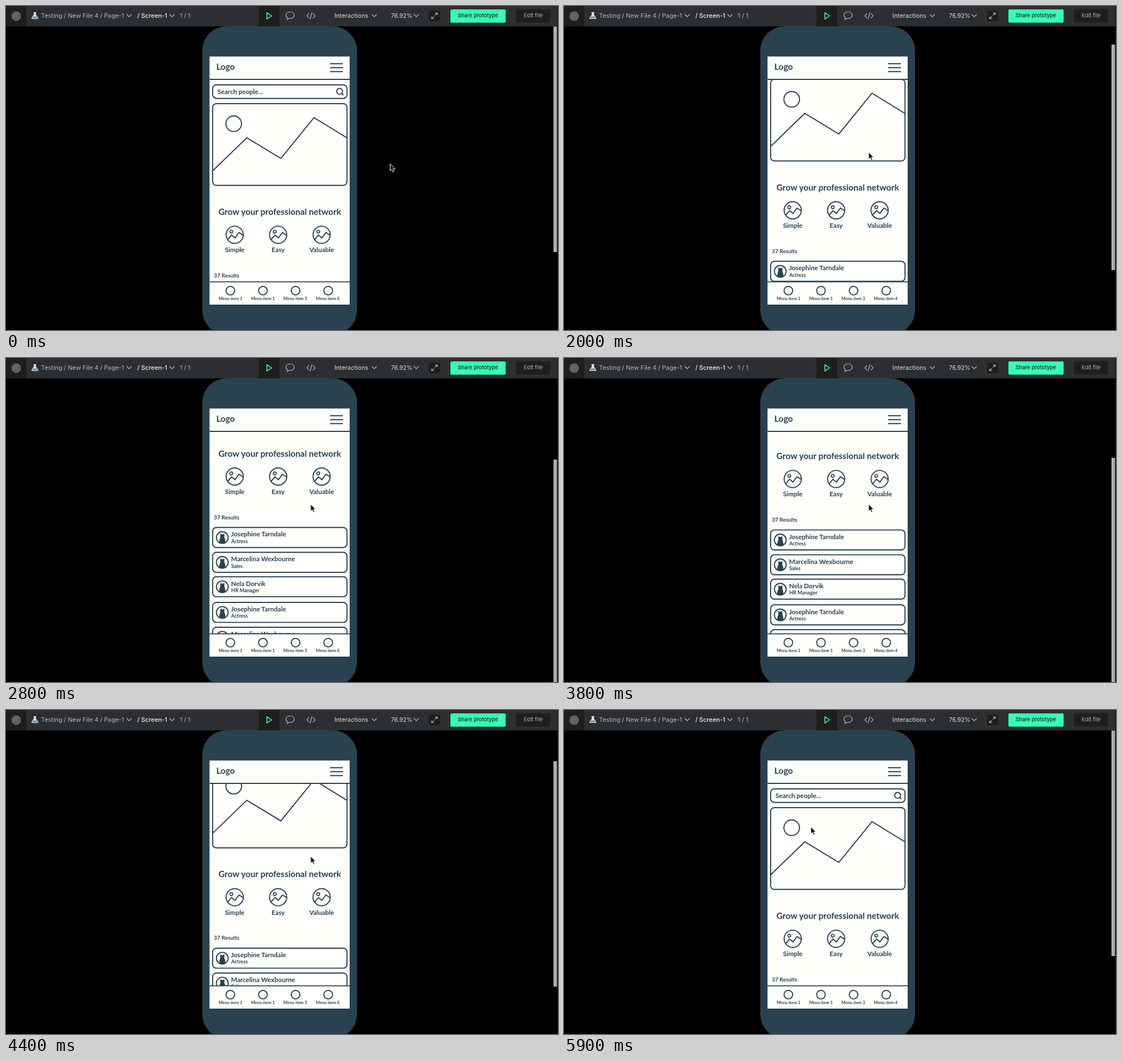
An HTML page for the animation above (6.3 s loop, 975 by 574 pixels).

```html
<!DOCTYPE html>
<html lang="en">
<head>
<meta charset="utf-8">
<title>Prototype viewer</title>
<style>
  html, body { margin: 0; width: 100%; height: 100%; overflow: hidden; background: #000; }
  svg { display: block; width: 975px; height: 574px; }
  .bar text { font: 400 10.8px Inter, sans-serif; fill: #b4b6b9; }
  .bar .on { font-weight: 500; fill: #f0f0f0; }
  .bar .line { fill: none; stroke: #b4b6b9; stroke-width: 1.2; stroke-linecap: round; stroke-linejoin: round; }
  .app text { font: 700 11.5px Lato, sans-serif; fill: #2a4150; }
  .app .title { font-size: 15.2px; }
  .app .note { font-size: 9.8px; }
  .app .role { font-size: 8.9px; }
  .app .item { font-size: 7.4px; }
  .app .mid { text-anchor: middle; }
  .ink { fill: none; stroke: #2a4150; stroke-width: 1.9; }
</style>
</head>
<body>
<svg viewBox="0 0 975 574">
  <defs>
    <clipPath id="view"><rect x="359.5" y="130" width="247.5" height="358"/></clipPath>
    <path id="chev" d="M-4 -2L0 2L4 -2"/>
    <g id="pic" class="ink">
      <circle r="15.2"/>
      <circle cx="-6" cy="-5.5" r="2.6" stroke-width="1.6"/>
      <path d="M-12.5 8.5L-5.5 .5L.5 5.5L7.5 -4L15 .8"/>
    </g>
    <g id="cat">
      <circle class="ink" r="10.4"/>
      <path fill="#2a4150" d="M-3.2 -7.5L-1.4 -5.5H1.6L3.4 -7.5L3.8 -3Q3.4 -1 4.3 1.5Q6.3 5 5.2 9.2Q0 11.5 -5.2 9.2Q-6 5 -4 1.5Q-3 -1 -3.6 -3Z"/>
    </g>
  </defs>

  <rect width="975" height="574"/>
  <rect x="974" width="1" height="574" fill="#2a0828"/>

  <g class="app">
    <rect x="346.7" y="36" width="273.3" height="546" rx="43" fill="#2a4250"/>
    <rect x="359.5" y="89.5" width="247.5" height="439.5" fill="#fffffb"/>
    <g clip-path="url(#view)">
      <g id="page">
        <rect class="ink" x="365" y="139.7" width="237.3" height="24" rx="6.5"/>
        <text x="373.5" y="155.5">Search people...</text>
        <g class="ink" stroke-width="1.5"><circle cx="589.3" cy="151.2" r="5.2"/><path d="M593 155L596 158"/></g>
        <rect class="ink" x="365" y="173" width="237.3" height="144.8" rx="6.5"/>
        <circle class="ink" cx="402.2" cy="208.6" r="13.8"/>
        <path class="ink" d="M365 292L425.3 233.5L485.5 270L544 197.7L602 233.5"/>
        <text class="title mid" x="483.5" y="370">Grow your professional network</text>
        <text class="note" x="367" y="481">37 Results</text>
      </g>
    </g>
    <text class="title" x="371.5" y="113">Logo</text>
    <path class="ink" d="M572.5 102.3H595M572.5 109.3H595M572.5 116.2H595M359.5 130H607M359.5 488.6H607"/>
    <g id="nav"></g>
  </g>

  <rect id="thumb" x="967" y="36.5" width="6.3" height="399.5" fill="#adadad"/>

  <g class="bar">
    <rect width="974" height="36" fill="#2c2f32"/>
    <path fill="#1e1e1d" d="M0 0H36V36H0ZM446 0H483V36H446ZM747 8H766.5V27H747Z"/>
    <circle cx="18" cy="18" r="8.5" fill="#626365"/>
    <path fill="#dfe5ea" d="M48.5 11H53.5V12.5H52.8V15L57 21Q57.5 23 55.5 23H46.5Q44.5 23 45 21L49.2 15V12.5H48.5Z"/>
    <path fill="#7d96a8" d="M47.5 18.5H54.5L56 21Q56.2 22 55 22H47Q45.8 22 46 21Z"/>
    <text x="62" y="21">Testing / New File 4 / Page-1</text>
    <text class="on" x="232" y="21">/ Screen-1</text>
    <text x="307" y="21">1 / 1</text>
    <text x="580" y="21" style="fill:#dcdcdc">Interactions</text>
    <text x="680" y="21" style="fill:#dcdcdc;font-size:10.4px">76.92%</text>
    <g class="line">
      <use href="#chev" x="217.5" y="17"/><use href="#chev" x="293.2" y="17"/>
      <use href="#chev" x="650.5" y="17"/><use href="#chev" x="724.7" y="17"/>
      <path d="M496.3 23.8L497 20.8C491.5 16.5 495.5 10.5 502 10.5C507.5 10.5 509 14 509 16.3C509 20.5 504.5 22.5 500.2 21.9Z"/>
      <path d="M535 13.5L531.3 17.3L535 21M542.5 13.5L546.2 17.3L542.5 21M540.3 11.5L537.3 23"/>
      <path d="M757.8 16.2L761.5 12.5M758.5 12.3H761.7V15.5M755.7 18.6L752 22.3M751.8 19.3V22.5H755"/>
    </g>
    <path d="M460.8 11.8L469.3 17.5L460.8 23.2Z" fill="none" stroke="#36ffb4" stroke-width="1.5" stroke-linejoin="round"/>
    <rect x="785" y="6" width="97.5" height="23.5" rx="2" fill="#36ffb4"/>
    <text x="833.5" y="20.3" text-anchor="middle" style="font-size:9.3px;font-weight:500;fill:#16201c">Share prototype</text>
    <rect x="901" y="6" width="60" height="23.5" rx="2" fill="#1e1e1d"/>
    <text x="931.3" y="20.3" text-anchor="middle" style="font-size:9.6px">Edit file</text>
  </g>

  <path id="arrow" d="M.5 .5V13L3.3 10.4L5.4 15L7.6 14L5.5 9.6H9.4Z" fill="#151515" stroke="#fff" stroke-width=".9"/>
</svg>

<script>
const $ = id => document.getElementById(id);
const add = (id, html) => $(id).insertAdjacentHTML('beforeend', html);

[['Simple', 404], ['Easy', 480.7], ['Valuable', 557.5]].forEach(([label, x]) =>
  add('page', `<use href="#pic" x="${x}" y="405.3"/><text class="mid" x="${x}" y="436.4">${label}</text>`));

const people = [['Josephine Tarndale', 'Actress'], ['Marcelina Wexbourne', 'Sales'], ['Nela Dorvik', 'HR Manager']];
[495.6, 539.6, 582.8, 628.3, 672.3].forEach((y, i) => {
  const [name, role] = people[i % 3];
  add('page', `<rect class="ink" x="365" y="${y}" width="237.3" height="35.4" rx="6.5"/>
    <use href="#cat" x="382" y="${y + 17.8}"/>
    <text x="397.5" y="${y + 16.2}">${name}</text>
    <text class="role" x="397.8" y="${y + 27.4}">${role}</text>`);
});

[1, 1, 3, 4].forEach((n, i) => {
  const x = 396.3 + i * 57.6;
  add('nav', `<circle class="ink" cx="${x}" cy="504.3" r="7.6"/>
    <text class="item mid" x="${x + .3 - i * .4}" y="521.4">Menu item ${n}</text>`);
});

const LOOP = 6300, TICK = 100;
// Each run: start time, then one value per tick; the last value holds.
const scrolls = [
  [0, 0],
  [1800, 5, 20, 43.3, 78, 101.5],
  [2400, 106, 122, 148, 178, 195.3],
  [3800, 191, 177, 153, 122, 95, 80, 73.6],
  [4600, 64, 40, 13, 0]
];
const path = (x0, y0, x1, y1, parts) => parts.map(p => [x0 + (x1 - x0) * p, y0 + (y1 - y0) * p]);
const moves = [
  [0, [678, 279]],
  [700, [616, 265]],
  [1000, [537.5, 258.5]],
  [5500, ...path(537.5, 258.5, 435.5, 206.5, [.07, .32, .65, .91, 1])]
];

function at(runs, t) {
  const [start, ...values] = runs.filter(r => r[0] <= t).pop();
  return values[Math.min(values.length - 1, Math.floor((t - start) / TICK))];
}

function draw() {
  const t = performance.now() % LOOP;
  const s = at(scrolls, t);
  $('page').setAttribute('transform', `translate(0 ${-s})`);
  $('thumb').setAttribute('y', 36.5 + s * .735);
  $('arrow').setAttribute('transform', `translate(${at(moves, t)})`);
  requestAnimationFrame(draw);
}
draw();
</script>
</body>
</html>
```
